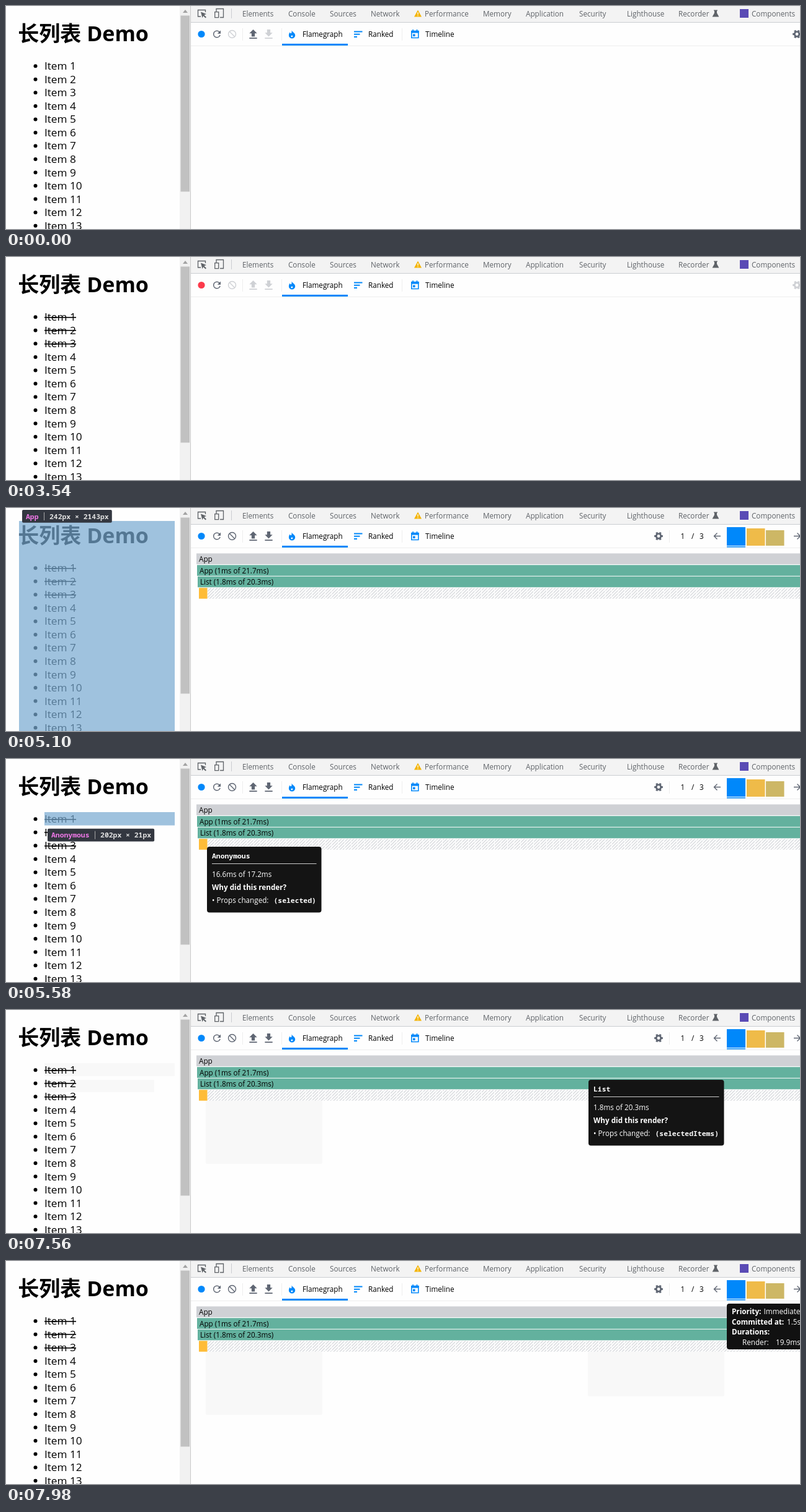
Animation, 1280 px wide and 361 px high, one loop 8 s. Source, as an HTML page:

```html
<!DOCTYPE html>
<html lang="zh-CN">
<meta charset="utf-8">
<title>Profiler demo</title>
<style>
  html, body { margin: 0; width: 100%; height: 100%; overflow: hidden; background: #fefefe; }
  svg { display: block; width: 1280px; height: 361px; }
  text { font: 11.7px "Open Sans", "Noto Sans", "Noto Sans CJK SC", "Noto Sans CJK", sans-serif; white-space: pre; }
  text.item { font-size: 17.2px; }
  text.title { font-size: 34px; font-weight: 700; }
  text.bold { font-weight: 700; }
  text.mono { font: 700 11.4px "Noto Sans Mono", "DejaVu Sans Mono", monospace; }
</style>
<svg id="stage" viewBox="0 0 1280 361"></svg>
<script>
const LOOP = 8000, RECORD = 780, STOP = 4020, CHART = 4080;
const BLUE = '#0088fa', HOVER = '#3578e5', RED = '#fc3a4b';
const DARK = '#5f6673', LIGHT = '#cfd1d5', TAB = '#5f6368', BLACK = '#000', WHITE = '#fff';
const CHAR = 6.84;

const rect = (x, y, w, h, fill, extra = '') =>
  `<rect x="${x}" y="${y}" width="${w}" height="${h}" fill="${fill}" ${extra}/>`;
const text = (x, y, str, fill = BLACK, cls = '') =>
  `<text x="${x}" y="${y}" fill="${fill}" class="${cls}">${str}</text>`;
const path = (d, fill, extra = '') => `<path d="${d}" fill="${fill}" ${extra}/>`;
const line = (d, color, w = 1.3) => path(d, 'none', `stroke="${color}" stroke-width="${w}"`);
const circle = (x, y, r, fill, extra = '') => `<circle cx="${x}" cy="${y}" r="${r}" fill="${fill}" ${extra}/>`;
const icon = (d, x, y, scale, fill) =>
  path(d, fill, `transform="translate(${x} ${y}) scale(${scale}) translate(-12 -12)"`);
// Visible during each [from, to) pair
const at = (spans, ...parts) => `<g data-spans="${spans}">${parts.join('')}</g>`;

const ring = (x, y, r, w, color, extra = '') =>
  circle(x, y, r, 'none', `stroke="${color}" stroke-width="${w}" ${extra}`);
const gear = (x, color) => ring(x, 45.5, 3.8, 2.8, color) +
  ring(x, 45.5, 5.8, 2.2, color, 'pathLength="12" stroke-dasharray="1 1" stroke-dashoffset=".5"');
const clearIcon = color => ring(364.5, 45.5, 6, 1.4, color) + line('M360.3 41.3l8.4 8.4', color, 1.4);
const upload = color => icon('M5 20h14v-2H5zm0-10h4v6h6v-6h4l-7-7z', 398.5, 46, .88, color);
const download = color => icon('M19 9h-4V3H9v6H5l7 7zM5 18v2h14v-2z', 423.5, 46, .88, color);
const record = color => circle(315, 45.5, 5.6, color);

function page() {
  let out = at([7140, 7620], rect(62, 86, 210, 21, '#f8f8f8'), rect(67, 113, 172, 20, '#f8f8f8'));
  out += text(19.3, 56.5, '长列表 Demo', BLACK, 'title');
  const strikes = [1680, 2280, 3060];
  for (let i = 0; i < 13; i++) {
    const y = 97.3 + i * 21.53;
    out += circle(47.5, y, 3, BLACK) + text(62, Math.round(y + 6), `Item ${i + 1}`, BLACK, 'item');
    if (i < 3) out += at([strikes[i], LOOP], rect(62, Math.floor(y), 51, 1.6, BLACK));
  }
  return out + rect(280, 0, 17, 361, '#f1f1f1') + path('M285 11l4-5 4 5z', '#a3a3a3') +
    rect(281.5, 15.5, 14.5, 285, '#c1c1c1') + at([3480, 3540], rect(281.5, 15.5, 14.5, 285, '#a8a8a8'));
}

function tabBar() {
  const tabs = { Elements: 381, Console: 455, Sources: 522, Network: 588, Performance: 675, Memory: 769,
    Application: 838, Security: 924, Lighthouse: 1001, Recorder: 1084, Components: 1202 };
  return rect(298, 0, 982, 26, '#f3f3f3') + rect(298, 26, 982, 1, '#cacdd1') + rect(297, 0, 1, 361, '#c8c8c8') +
    line('M314 17h-4.5V6.5h12V10', TAB) + path('M314 9.5l9 3.6-3.6 1.4 3.6 3.6-1.4 1.4-3.6-3.6-1.5 3.4z', TAB) +
    line('M339 9V4.5h11.5v14H345M336.7 9.7h6v9h-6z', TAB) + rect(363, 4, 1, 16, '#cacdd1') +
    path('M664 6.5l6 11h-12z', '#f4b400') + rect(663.4, 10, 1.3, 4, WHITE) + rect(663.4, 15, 1.3, 1.3, WHITE) +
    path('M1141 6.5h6v1.3h-1v3.4l3.4 6.3h-10.8l3.4-6.3V7.8h-1z', TAB) +
    rect(1183, 5, 14, 14, '#5a4bb5') +
    Object.entries(tabs).map(([name, x]) => text(x, 17, name, TAB)).join('');
}

function toolbar() {
  const bars = [[1162, 31, 30, 30, BLUE], [1194, 33, 29.5, 28, '#efbb49'], [1225, 36, 29.5, 25, '#cdb765']];
  return rect(298, 64, 982, 1, '#eeeeee') +
    [381, 444, 638].map(x => rect(x, 36, 1, 20, '#eeeeee')).join('') +
    at([0, 540, 4260, LOOP], record(BLUE)) + at([540, RECORD, STOP, 4260], record(HOVER)) +
    at([RECORD, STOP], record(RED)) +
    icon('M17.65 6.35A8 8 0 0012 4a8 8 0 107.73 10h-2.08A6 6 0 1112 6c1.66 0 3.14.69 4.22 1.78L13 11h7V4z',
      340, 45.5, .76, DARK) +
    at([0, CHART], clearIcon(LIGHT), download(LIGHT)) +
    at([CHART, LOOP], clearIcon(DARK), download(DARK)) +
    at([0, RECORD, CHART, LOOP], upload(DARK)) + at([RECORD, CHART], upload(LIGHT)) +
    at([0, RECORD], gear(1275, DARK)) + at([RECORD, CHART], gear(1275, LIGHT)) +
    path('M460.5 39c.5 3 5.7 4.4 5.7 8.4a5.1 5.1 0 01-10.3 0c0-2.4 1-4 2-5 .2 1.4.7 1.9 1.4 1.9 1.2 0 1.6-2.8 1.2-5.3z', BLUE) +
    path('M461.3 47.5c-1.5.3-2 1-1.9 1.9.3 1.3 2.7 1.3 2.9-.5 0-.6-.3-1.1-1-1.4z', WHITE) +
    text(478, 50, 'Flamegraph') + rect(445, 61, 106, 3, BLUE) +
    rect(561, 40.5, 13.5, 2, BLUE) + rect(561, 44.7, 9.5, 2, BLUE) + rect(561, 49, 5, 2, BLUE) +
    text(584, 50, 'Ranked') +
    line('M653.8 40.5h11v11h-11z', BLUE, 1.6) + rect(653, 40, 12.6, 3.6, BLUE) +
    rect(655.3, 38, 1.6, 3, BLUE) + rect(661.7, 38, 1.6, 3, BLUE) + rect(656, 45.5, 3.6, 3.6, BLUE) +
    text(676, 50, 'Timeline') +
    at([CHART, LOOP], gear(1052, DARK), rect(1069, 36, 1, 20, '#eeeeee'),
      text(1087.5, 50, '1'), text(1105, 50, '/'), text(1118, 50, '3'),
      line('M1152 45.5h-10.5M1146.5 40.5l-5 5 5 5', DARK, 1.4),
      line('M1270 45.5h10.5M1275.5 40.5l5 5-5 5', DARK, 1.4),
      ...bars.map(b => rect(...b)), rect(1162, 62, 30, 1.6, BLUE));
}

function chart() {
  let gaps = '';
  for (let x = 335.5; x < 1280; x += 10.5) gaps += rect(x, 129, 1, 18, '#fefefe');
  return `<pattern id="hatch" width="5" height="5" patternUnits="userSpaceOnUse">
      ${line('M-1 6L6 -1M-1 1L1 -1M4 6L6 4', '#d8dadd', 1.4)}</pattern>` +
    at([7140, LOOP], rect(322, 147, 188, 102, '#f8f8f8', 'rx="2"')) +
    at([7680, LOOP], rect(938, 147, 220, 72, '#f8f8f8', 'rx="2"')) +
    at([CHART, LOOP],
      rect(307, 73.5, 973, 17.5, '#cfd1d5'), text(311, 87, 'App'),
      rect(308, 92.3, 972, 17.5, '#63b19e'), text(312, 105.5, 'App (1ms of 21.7ms)'),
      rect(309, 110.8, 971, 17.5, '#63b19e'), text(313, 124, 'List (1.8ms of 20.3ms)'),
      rect(325, 129.3, 955, 17.5, 'url(#hatch)'), gaps, rect(311, 129.3, 13.5, 17.5, '#febc38'));
}

function highlight(x, y, h, tagY, name, size) {
  const sep = x + 19.5 + name.length * CHAR;
  return rect(x, y, 272 - x, h, 'rgba(120,170,210,.7)') +
    rect(x + 5, tagY, sep + 14 + size.length * CHAR - x - 5, 20.7, '#333740', 'rx="2"') +
    text(x + 11, tagY + 14.7, name, '#ee78e6', 'mono') + rect(sep, tagY + 4, 1, 13, '#aaaaaa') +
    text(sep + 9, tagY + 14.7, size, '#e0e0e0', 'mono');
}

const tooltip = (x, y, w, name, time, prop) =>
  rect(x, y, w, 106.5, '#141414', 'rx="4"') + text(x + 8, y + 19, name, WHITE, 'mono') +
  rect(x + 8, y + 27, w - 16, 1, '#cccccc') + text(x + 8, y + 49, time, WHITE) +
  text(x + 8, y + 70, 'Why did this render?', WHITE, 'bold') +
  text(x + 8, y + 91, '• Props changed:', WHITE) + text(x + 107.5, y + 91, `(${prop})`, WHITE, 'mono');

const commitValues = (when, render) => text(1259, 102.5, when, WHITE) + text(1241, 136, render, WHITE);

function overlays() {
  return at([3780, STOP], rect(302.5, 66.5, 91, 24, WHITE, 'stroke="#bdbdbd"'), text(310, 83, 'Stop profiling', '#575757')) +
    at([5100, 5220, 7680, 7740], highlight(21, 21, 340, 3, 'App', '242px × 2143px')) +
    at([5220, 5400, 7620, 7680], highlight(21, 86, 275, 68, 'List', '242px × 2064px')) +
    at([5400, 7080], highlight(62, 86, 21.5, 112.7, 'Anonymous', '202px × 21px')) +
    at([5520, 7140], tooltip(324, 142, 184.5, 'Anonymous', '16.6ms of 17.2ms', 'selected')) +
    at([7560, 7680], tooltip(939, 113, 218.5, 'List', '1.8ms of 20.3ms', 'selectedItems')) +
    at([7740, LOOP], rect(1162, 69, 130, 74, '#111111', 'rx="4"'),
      text(1170, 86, 'Priority:', WHITE, 'bold'), text(1221.5, 86, 'Immediate', WHITE),
      text(1170, 102.5, 'Committed at:', WHITE, 'bold'), text(1170, 119, 'Durations:', WHITE, 'bold'),
      text(1187, 136, 'Render:', WHITE)) +
    at([7740, 7980], commitValues('0.9s', '21.7ms')) + at([7980, LOOP], commitValues('1.5s', '19.9ms'));
}

const stage = document.getElementById('stage');
stage.innerHTML = page() + tabBar() + toolbar() + chart() + overlays();
const timed = [...stage.querySelectorAll('[data-spans]')].map(el => ({ el, spans: el.dataset.spans.split(',').map(Number) }));

const start = performance.now();
function draw() {
  const t = (performance.now() - start) % LOOP;
  for (const { el, spans } of timed) {
    // An odd number of passed edges means inside a span
    const visible = spans.filter(edge => edge <= t).length % 2;
    el.style.display = visible ? '' : 'none';
  }
  requestAnimationFrame(draw);
}
draw();
</script>
</html>
```
